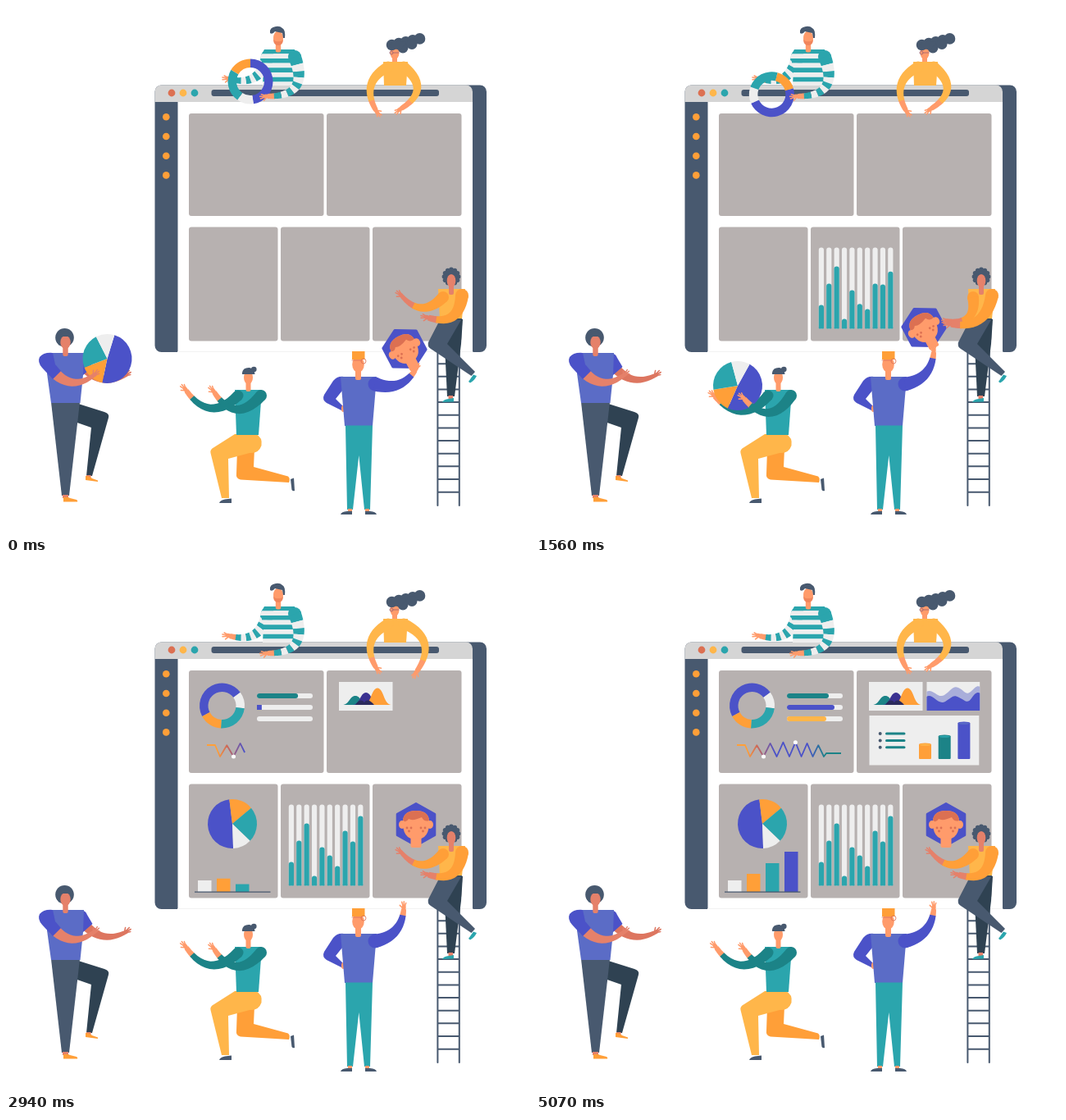
Write an HTML page with a canvas that moves like this. It is 639x645 px and loops after 5.4 s.

```html
<!DOCTYPE html>
<html lang="en">
<head>
<meta charset="utf-8">
<title>Dashboard team</title>
<style>
html, body { margin: 0; width: 100%; height: 100%; overflow: hidden; background: #fff; }
canvas { display: block; width: 639px; height: 645px; }
</style>
</head>
<body>
<canvas id="stage"></canvas>
<script>
const LOOP = 5400, W = 639, H = 645;
const NAVY = '#48596f', DARK = '#2f4252', TEAL = '#2ba5ad', DEEP = '#1c8387', BLUE = '#4b52c8',
  SHIRT = '#5b6cc6', ORANGE = '#ff9f38', YELLOW = '#ffb64a', SKIN = '#ff9b6b', TAN = '#e5816a',
  RED = '#dc7052', PALE = '#eeeeee', PANEL = '#b7b1b0';
const canvas = document.getElementById('stage'), g = canvas.getContext('2d');
const dpr = window.devicePixelRatio || 1;
canvas.width = W * dpr;
canvas.height = H * dpr;
let t = 0;

// Timing
const clamp = p => Math.min(1, Math.max(0, p));
const ease = p => (p = clamp(p), p < .5 ? 4 * p ** 3 : 1 - 4 * (1 - p) ** 3);
const ramp = (start, dur) => ease((t - start) / dur);
const sway = (out, there, back, home) => ramp(out, there - out) - ramp(back, home - back);
const mix = (a, b, p) => a + (b - a) * p;

// Drawing
function fill(col, d) {
  g.fillStyle = col;
  g.fill(new Path2D(d));
}
function line(col, w, d) {
  g.strokeStyle = col;
  g.lineWidth = w;
  g.stroke(new Path2D(d));
}
function box(col, x, y, w, h, r = 0) {
  if (w <= 0 || h <= 0) return;
  g.fillStyle = col;
  g.beginPath();
  g.roundRect(x, y, w, h, r);
  g.fill();
}
function oval(col, x, y, rx, ry = rx) {
  g.fillStyle = col;
  g.beginPath();
  g.ellipse(x, y, rx, ry, 0, 0, 7);
  g.fill();
}
function clipped(d, draw) {
  g.save();
  g.clip(new Path2D(d));
  draw();
  g.restore();
}
function slices(x, y, r, hole, rot, parts) {
  let a = rot * Math.PI / 180;
  for (const [col, deg] of parts) {
    const b = a + deg * Math.PI / 180;
    g.fillStyle = col;
    g.beginPath();
    g.arc(x, y, r, a, b);
    if (hole) g.arc(x, y, hole, b, a, true);
    else g.lineTo(x, y);
    g.fill();
    a = b;
  }
}

function hand(x, y, angle, col) {
  g.save();
  g.translate(x, y);
  g.rotate(angle);
  g.scale(.85, .85);
  oval(col, 2, 0, 4.5, 3);
  line(col, 1.8, 'M3 -1L10 -3.5M4 0L11 -.5M3 1L9 2.5M1 -1L5 -6');
  g.restore();
}

// Tapered limb from shoulder to hand, bowed sideways; sleeve up to k, then skin
function arm(x, y, hx, hy, bend, w0, w1, sleeve, skin, k, bands = 1) {
  const d = Math.hypot(hx - x, hy - y);
  const cx = (x + hx) / 2 - (hy - y) / d * bend, cy = (y + hy) / 2 + (hx - x) / d * bend;
  const edge = (u, side) => {
    const v = 1 - u, dx = v * (cx - x) + u * (hx - cx), dy = v * (cy - y) + u * (hy - cy);
    const s = side * mix(w0, w1, u) / 2 / Math.hypot(dx, dy);
    return [v * v * x + 2 * u * v * cx + u * u * hx - dy * s,
      v * v * y + 2 * u * v * cy + u * u * hy + dx * s];
  };
  const strip = (a, b, col) => {
    g.fillStyle = col;
    g.beginPath();
    for (let i = 0; i <= 12; i++) g.lineTo(...edge(mix(a, b, i / 12), 1));
    for (let i = 12; i >= 0; i--) g.lineTo(...edge(mix(a, b, i / 12), -1));
    g.fill();
  };
  hand(hx, hy, Math.atan2(hy - cy, hx - cx), skin);
  strip(Math.max(0, k - .02), 1, skin);
  if (!k) return;
  oval(sleeve[0], x, y, w0 / 2);
  for (let i = 0; i < bands; i++) strip(k * i / bands, k * (i + 1) / bands, sleeve[i % sleeve.length]);
}

function head(x, y, rx, ry, neck, col) {
  box(col, x - neck, y, neck * 2, ry + 9, 2);
  oval(col, x, y, rx, ry);
}

// Window and charts
function browser() {
  box(NAVY, 181.5, 96.5, 404.5, 325.5, 8);
  box('#fff', 209.5, 117, 359.5, 305);
  line('#f2f2f2', 1, 'M209.5 421.5H569');
  box('#d5d5d5', 181.5, 96.5, 387.5, 20.5, [8, 8, 0, 0]);
  [RED, YELLOW, TEAL].forEach((c, i) => oval(c, 202 + 14 * i, 106, 4.4));
  box(NAVY, 250.5, 102, 277.5, 8, 3);
  for (let i = 0; i < 4; i++) oval(ORANGE, 195.3, 135.3 + 23.7 * i, 4.3);
  for (let i = 0; i < 2; i++) box(PANEL, 223 + 168 * i, 131, 164.5, 125, 3);
  for (let i = 0; i < 3; i++) box(PANEL, 223 + 112 * i, 269.5, 108.5, 139, 3);
}

function columns() {
  [29, 55, 76, 12, 47, 37, 24, 67, 54, 85].forEach((full, i) => {
    const x = 344.8 + 9.38 * i, track = 99 * ramp(15 * i, 330);
    const start = i % 2 ? Math.min(1110, 130 + 200 * i) : 150 + 32 * i;
    const h = full * ramp(start, 700), r = Math.min(3, h / 2);
    box(PALE, x, 393.5 - track, 6.2, track, 3);
    box(TEAL, x, 393.5 - h, 6.2, h, [r, r, 1, 1]);
  });
}

function progress() {
  [[DEEP, 51], [BLUE, 58], [YELLOW, 48]].forEach(([col, full], i) => {
    const y = 159 + 14 * i, w = full * ramp(2440 + 325 * i, 600);
    box(PALE, 306, y, 68 * ramp(2100, 450), 6, 3);
    box(col, 306, y, w, 6, w < 10 ? 0 : 3);
  });
}

const zig = [[245, 222], [255, 222]];
for (let i = 0; i < 13; i++) {
  const swell = Math.sin(Math.PI * i / 12);
  zig.push([261 + 7.5 * i + 3 * swell, i % 2 ? 223.5 - 5 * swell : 236]);
}
zig.push([354, 232], [372, 232]);
const zigLength = zig.reduce((s, [x, y], i) => i ? s + Math.hypot(x - zig[i - 1][0], y - zig[i - 1][1]) : 0, 0);

function trend() {
  const p = clamp((t - 2307) / 1862);
  if (!p) return;
  const grad = g.createLinearGradient(245, 0, 372, 0);
  [[.1, ORANGE], [.2, '#c9665b'], [.36, BLUE], [.68, BLUE], [.85, DEEP]].forEach(s => grad.addColorStop(...s));
  g.save();
  g.setLineDash([zigLength * p, zigLength * 2]);
  g.lineCap = 'butt';
  line(grad, 1.8, 'M' + zig.join('L'));
  g.restore();
  if (p > .28) oval('#fff', ...zig[4], 2.5);
  if (p > .58) oval('#fff', ...zig[9], 2.5);
}

function bars() {
  [[PALE, 14, 2400], [ORANGE, 22, 2690], [TEAL, 35, 2770], [BLUE, 49, 3440]].forEach(([col, full, start], i) => {
    const h = full * ramp(start, 420);
    box(col, 234 + 23 * i, 401 - h, 16.5, h);
  });
  box(NAVY, 230, 400.5, 92.5 * ramp(2250, 400), 1.2);
}

function hill(col, x, top, half) {
  const y = mix(173, top, ramp(2480, 380)), s = half * .45;
  fill(col, `M${x - half} 173C${x - s} 173 ${x - s} ${y} ${x} ${y}S${x + s} 173 ${x + half} 173Z`);
}

function cylinder(i, col, lid) {
  const p = ramp(3990 + 315 * i, 400), x = 467 + 23.7 * i, y = mix(238.5, 221.3 - 7 * i - 3 * i * i, p);
  if (!p) return;
  box(col, x, y, 15, 239 - y, [0, 0, 1, 1]);
  oval(col, x + 7.5, y, 7.5, 1.8);
  oval(lid, x + 7.5, y + .3, 6.7, 1.2);
}

function report() {
  box(PALE, 406, 145, 65.5, 35 * ramp(2200, 400));
  if (t > 2480) {
    hill(DEEP, 426, 162, 16);
    hill('#3a3191', 439, 158, 16);
    hill(ORANGE, 453, 152.5, 17);
    fill('#2b2a5c', 'M426 173Q432 164 437 170Q441 164 449 173Z');
  }
  box(PALE, 476.5, 145, 64.7, 35 * ramp(2940, 400));
  clipped(`M476.5 145h${64.7 * ramp(3150, 600)}v35H476.5Z`, () => {
    fill('#a9aeda', 'M476 157C484 152 490 166 498 161S508 149 515 152S524 162 530 157S537 149 542 151V180H476Z');
    fill(BLUE, 'M476 163C484 158 490 174 499 169S508 160 516 164S526 172 531 165S538 157 542 159V180H476Z');
  });
  box(PALE, 406.5, 186, 133.8, 60.5 * ramp(3360, 450));
  for (let i = 0; i < 3; i++) {
    const y = 208 + 8.4 * i, start = 3560 + 100 * i;
    oval(NAVY, 419.7, y, 2 * ramp(start, 150));
    box(DEEP, 426, y - 1.5, 24.5 * ramp(start, 250), 3, 1.5);
  }
  [[ORANGE, YELLOW], [DEEP, TEAL], [BLUE, SHIRT]].forEach((pair, i) => cylinder(i, ...pair));
}

function ladder() {
  let d = 'M526.4 420V609M552.8 420V609';
  for (let y = 420.5; y < 600; y += 15.65) d += `M526.4 ${y}H552.8`;
  line(NAVY, 2, d);
}

// People
function topMan() {
  arm(319, 62, 273, 89, -27, 16, 6, [TEAL, PALE], SKIN, .9, 9);
  clipped('M315 53H352L355 62L352 97H313L314 75L310 62Z', () => {
    for (let i = 0; i < 8; i++) box(i % 2 ? PALE : TEAL, 305, 52.5 + 5.7 * i, 56, 5.8);
  });
  head(332, 39, 6, 8.5, 3.2, SKIN);
  fill('#f0855c', 'M326 40Q326 48 332 48Q338 48 338 40Q336 44 332 43Q328 44 326 40Z');
  fill(NAVY, 'M322 33Q321 26 329 25Q334 24 337 27Q341 29 340 39H338L337 33L328 31Q325 35 322 33Z');
}

function topWoman() {
  box(SKIN, 471, 58, 6, 12, 2);
  oval(SKIN, 474, 57, 5.5, 8);
  for (let i = 0; i < 5; i++) oval(NAVY, 470.5 + 8.5 * i, 47.5 - 1.9 * i, 6.8);
  oval(NAVY, 484, 51, 6.5);
  oval(NAVY, 495, 46.5, 6.5);
  fill(NAVY, 'M465 50L474 42L488 44L481 54Z');
  line('#9d6070', .8, 'M468 57a2 2 0 1 0 4 0a2 2 0 1 0 -4 0M472 57H479');
  fill(YELLOW, 'M460 68H490L488 97H461Z');
  const left = sway(1800, 2160, 2300, 2760), right = sway(2460, 2900, 2980, 3390);
  arm(466, 74, 451 - 7 * left, 127 + 8 * left, 28, 13, 6, [YELLOW], SKIN, .82);
  arm(485, 74, 482 + 19 * right, 125 + 7 * right, -36, 13, 6, [YELLOW], SKIN, .82);
}

const lift = () => sway(300, 650, 700, 1110);

function leftMan() {
  arm(98, 443, 144, 451 - 5 * lift(), 17, 12, 5, [], '#dd7660', 0);
  fill(DARK, 'M85 484L120 495Q126.5 497 125 502L105 573H98L104 514L84 507Z');
  fill(NAVY, 'M55 483H90L77 597H68Z');
  fill(BLUE, 'M90 424Q97 423 99 429L105.5 440L94 450Z');
  fill(SHIRT, 'M55 423H95L94 450L90.5 484H55L50 448Z');
  box(TAN, 69, 596, 7, 4);
  box(TAN, 98, 572, 5.5, 4);
  fill(ORANGE, 'M70 604V599Q75 598 78 600L86 602Q88 603 87 604.5H70Z');
  fill(ORANGE, 'M97 578V573Q102 573 105 576L112 578.5V580Z');
  oval(NAVY, 71.5, 404.3, 11.3);
  head(72.5, 410, 6.2, 8, 3.2, TAN);
  fill(NAVY, 'M61 402Q71 390 82 403H66L65 414Q60 409 61 402Z');
}

const hold = () => sway(850, 1200, 1800, 2050);

function kneeler() {
  fill(ORANGE, 'M282 541L303 540L302 562L344 573.5Q347 576 345 581L286 577.5Q280 576 281 570Z');
  fill(YELLOW, 'M279 522H305Q313 526 311.5 536Q308 546 297 545L271 552L272 600H263L249.5 545Q248.5 541 253 538.5Z');
  fill(TEAL, 'M279 468H312L308 523H281Z');
  fill(NAVY, 'M260 606Q261 602.5 267 601.5L275 600.5V606H260Z');
  fill(NAVY, 'M347 577L351 575.5L352 591Q350 592 348.5 590Z');
  head(295.5, 453, 5.5, 8, 3, SKIN);
  oval(NAVY, 302.3, 443, 3.3);
  fill(NAVY, 'M288 447Q289 440.5 297 441Q303 442 303.5 449H288Z');
  arm(283, 475, 220 - 2 * hold(), 469 + 7 * hold(), -37, 13, 6, [DEEP], SKIN, .88);
}

function standing() {
  fill(BLUE, 'M412 452Q404 451 399 457L388 474Q385 480 391 484L411 494V488L402 479L414 464Z');
  oval(SKIN, 411, 491, 2, 4);
  fill(SHIRT, 'M408 452H452L447 512H413Z');
  fill(TEAL, 'M414 511.5H447L444 614H437L430.3 548L423 614H416Z');
  box(SKIN, 417, 613, 5, 4);
  box(SKIN, 438, 613, 5, 4);
  fill(NAVY, 'M408 620Q409 616.5 416 616H422V620Z');
  fill(NAVY, 'M452 620Q451 616.5 444 616H438V620Z');
  head(429.5, 437, 7.3, 10, 3.5, SKIN);
  box(ORANGE, 422, 421, 15.5, 10);
  line(RED, .8, 'M433 433a3 3 0 1 0 6 0a3 3 0 1 0 -6 0M422 432H433');
}

function climber() {
  fill(DARK, 'M545 382H557L555 412L547 476H538L535 414Z');
  fill(NAVY, 'M530 381H556L538 412L572 446L567.5 451L518 418Q513.5 415 515 410Z');
  fill(YELLOW, 'M527 345H560L556 381H529Z');
  line(DARK, 1.2, 'M530 382H556');
  box(TAN, 539.5, 475, 5.5, 4);
  fill(TEAL, 'M532 483Q534 479.5 540 479L546 478V482.5Z');
  fill(TEAL, 'M564 458L570 449.5L574 451Q571 457 566 459.5Z');
  for (let a = 0; a < 6.2; a += Math.PI / 6) oval(NAVY, 543 + 8.6 * Math.cos(a), 330 + 8.6 * Math.sin(a), 2.8);
  oval(NAVY, 543, 330, 9.5);
  head(543, 335, 5.3, 8, 3, TAN);
  fill(NAVY, 'M536 331Q543 323 550 331L549 327L538 326Z');
}

// Things passed along
const raise = () => ramp(1080, 420);

function hexagon() {
  const up = raise(), place = ramp(1650, 510);
  const hex = 'M0 -25.5L22.8 -12.8V12.8L0 25.5L-22.8 12.8V-12.8Z';
  g.save();
  g.translate(486 - 13 * up + 27 * place, 418 - 26 * up - 73 * place);
  g.rotate(-28 * (1 - place) * Math.PI / 180);
  fill(BLUE, hex);
  line(BLUE, 3, hex);
  box(SKIN, -6.5, 10, 13, 18, 2);
  fill(SKIN, 'M-16 -5Q-15 -17 0 -17Q15 -17 16 -5Q17 18 0 18Q-17 18 -16 -5Z');
  fill(RED, 'M-16 -5Q-15 -17 0 -17Q15 -17 16 -5Q10 -3 7 -9Q-4 -4 -9 -7Q-12 -2 -16 -5Z');
  for (const s of [-1, 1]) {
    oval(SKIN, 17 * s, 0, 4, 5);
    for (let i = 0; i < 3; i++) oval(RED, s * (6 + 2.5 * i), i % 2 ? 8 : 4, 1.4);
  }
  g.restore();
}

function pie() {
  const u = ramp(360, 840), v = 1 - u, put = ramp(1800, 600);
  const x = v * v * 123.5 + 2 * u * v * 181 + u * u * 246;
  const y = v * v * 430 + 2 * u * v * 378 + u * u * 463;
  slices(mix(x, 276, put), mix(y, 318, put), 30, 0, 372 * u + 149 * ramp(1800, 840) - 73,
    [[BLUE, 175], [ORANGE, 57], [TEAL, 84], [PALE, 44]]);
}

function ring() {
  const p = ramp(1140, 990);
  slices(mix(298, 263.5, p), mix(92, 174, p ** 1.4), 27.5, 17, 242 * p - 90,
    [[BLUE, 172], [PALE, 43], [TEAL, 86], [ORANGE, 59]]);
}

function nearArms() {
  arm(58, 446, 106 + 6 * lift(), 451 - 5 * lift(), 21, 14, 5, [], TAN, 0);
  fill(BLUE, 'M57 423Q46 422 41 428Q38 434 44 441L57 455L67 445L60 437Z');
  arm(311, 475, 254, 471 + 8 * hold(), -38, 14, 6, [DEEP], SKIN, .88);
  arm(450, 461, 499 - 14 * raise(), 444 - 22 * raise(), 20, 17, 6, [BLUE], SKIN, .88);
  const take = sway(1140, 1530, 1650, 2130), put = sway(1650, 2130, 2250, 2760);
  arm(533, 355, 483 + 21 * take + 7 * put, 354 + 30 * take - 6 * put, -27, 14, 5, [ORANGE], TAN, .72);
  arm(556, 353, 515 - 9 * take - 21 * put, 380 + 8 * take - 30 * put, -30, 16, 7, [ORANGE], TAN, .86);
  arm(352, 62, 319, 110, -43, 16, 6, [TEAL, PALE], SKIN, .92, 9);
}

function frame(now) {
  t = now % LOOP;
  g.setTransform(dpr, 0, 0, dpr, 0, 0);
  g.lineCap = g.lineJoin = 'round';
  box('#fff', 0, 0, W, H);
  [browser, columns, progress, trend, bars, report, ladder, topMan, topWoman, leftMan, kneeler, standing, climber,
    pie, ring, hexagon, nearArms].forEach(draw => draw());
}

const begin = performance.now();
function tick() {
  frame(performance.now() - begin);
  requestAnimationFrame(tick);
}
tick();
</script>
</body>
</html>
```
